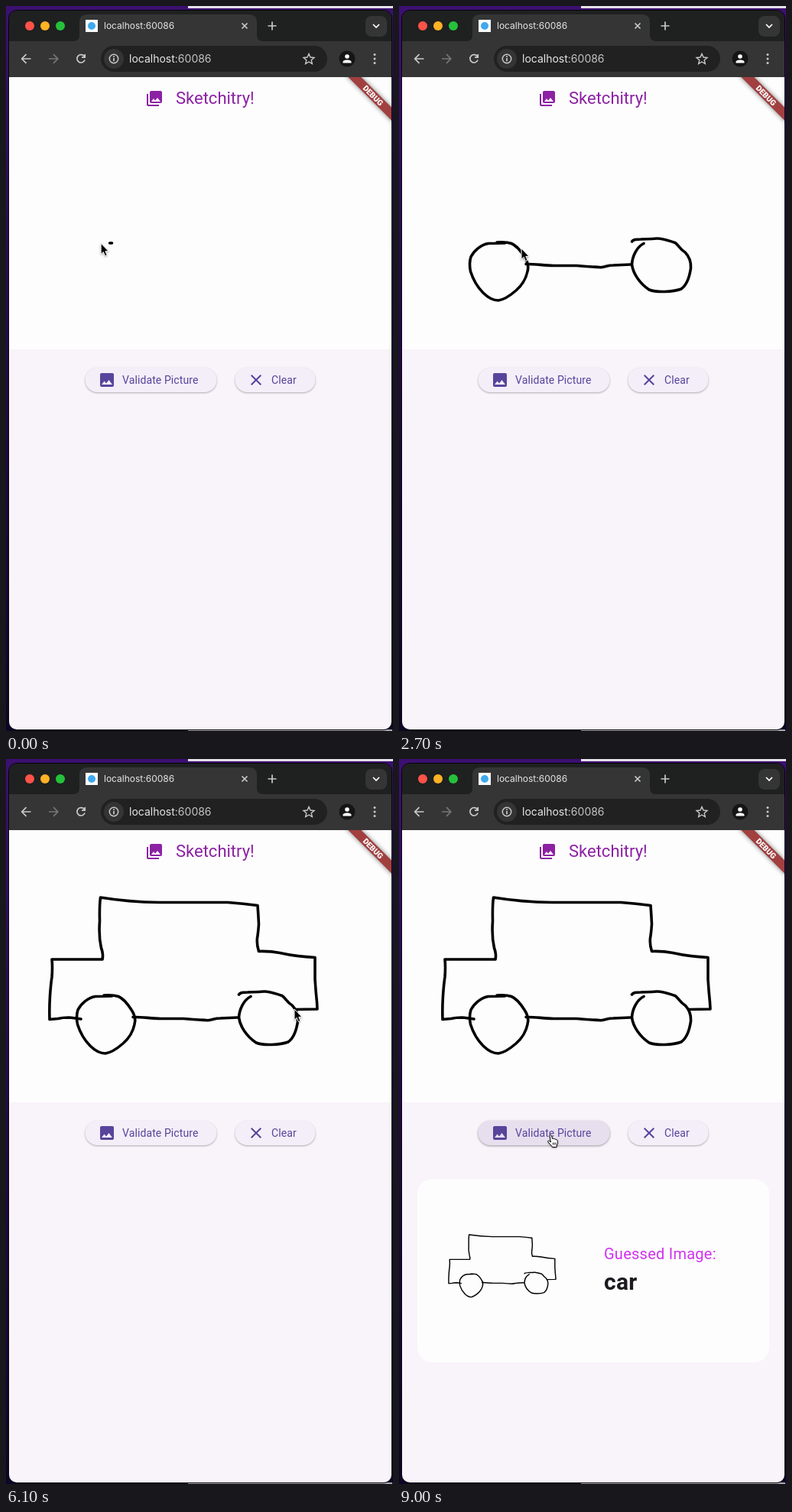
An HTML page for the animation above (9100 ms loop, 506 px wide and 948 px high).

```html
<!DOCTYPE html>
<html lang="en">
<head>
<meta charset="utf-8">
<title>Sketch guess</title>
<style>
html, body { margin: 0; width: 100%; height: 100%; overflow: hidden; background: #1a0838; }
svg { display: block; }
text { font-family: Roboto, sans-serif; }
.chrome { font-family: Inter, sans-serif; fill: #e6e6e6; }
.line { fill: none; stroke: #c9c9c9; stroke-width: 1.7; }
.ink { fill: none; stroke: #000; stroke-width: 3.6; stroke-linecap: round; stroke-linejoin: round; }
.button { fill: #f3eef8; filter: drop-shadow(0 1px 1px rgba(0, 0, 0, .3)); }
.button.hover { fill: #e7dfee; filter: drop-shadow(0 1.5px 1.8px rgba(0, 0, 0, .38)); }
.label { fill: #58449b; font-size: 14px; letter-spacing: .1px; }
.cursor { filter: drop-shadow(0 1px 1px rgba(0, 0, 0, .35)); }
</style>
</head>
<body>
<svg width="506" height="948" viewBox="0 0 506 948">
  <defs>
    <linearGradient id="desk" x2="0" y2="1">
      <stop offset="0" stop-color="#3c1070"/>
      <stop offset=".35" stop-color="#2a0a52"/>
      <stop offset="1" stop-color="#0d0626"/>
    </linearGradient>
    <clipPath id="window"><rect x="4" y="6" width="500" height="940" rx="10"/></clipPath>
    <clipPath id="page"><rect x="4" y="93" width="500" height="853"/></clipPath>
    <filter id="blur" x="-30%" y="-100%" width="160%" height="300%"><feGaussianBlur stdDeviation="3"/></filter>
  </defs>

  <!-- desktop -->
  <rect width="506" height="948" fill="url(#desk)"/>
  <path d="M238 0H506V3H238Z" fill="#e4dfe8"/>
  <path d="M505 10V948H238V946H505Z" fill="#a9a6ac"/>
  <rect x="3.5" y="5.5" width="501" height="941" rx="10.5" fill="none" stroke="#050308"/>

  <g clip-path="url(#window)">
    <!-- browser -->
    <rect x="4" y="6" width="500" height="40" fill="#1f2020"/>
    <path d="M4 46H88Q96 46 96 38V21Q96 11 106 11H318Q328 11 328 21V38Q328 46 336 46H504V93H4Z" fill="#353535"/>
    <circle cx="31" cy="26" r="6" fill="#ff5249"/>
    <circle cx="51" cy="26" r="6" fill="#ffb224"/>
    <circle cx="71" cy="26" r="6" fill="#25c13b"/>
    <rect x="104" y="18" width="16" height="16" fill="#fdfdfd"/>
    <circle cx="112" cy="26" r="5" fill="#3fa9ee"/>
    <text class="chrome" x="128" y="30" font-size="12">localhost:60086</text>
    <path class="line" d="M308.5 22.5l7 7m0-7l-7 7M342.500 26h11M348 20.500v11"/>
    <rect x="470" y="13" width="28" height="27" rx="8" fill="#353535"/>
    <path class="line" d="M480 24l4 4 4-4" style="stroke:#fff"/>
    <path class="line" d="M32.500 69H21M26.500 63.200L20.700 69l5.800 5.800"/>
    <path class="line" d="M56 69h11.500M62 63.200L67.800 69 62 74.800" style="stroke:#767676"/>
    <path class="line" d="M102.500 66A5.200 5.200 0 1 0 103 70.500M103.200 63v4.200h-4.200"/>
    <rect x="124" y="52" width="296" height="34" rx="17" fill="#212121"/>
    <circle cx="141" cy="69" r="13" fill="#343434"/>
    <circle class="line" cx="141" cy="69" r="5.700" style="stroke-width:1.500"/>
    <path class="line" d="M141 68v4.200M141 65.300v1.700"/>
    <text class="chrome" x="161" y="74" font-size="14">localhost<tspan fill="#c4c4c4">:60086</tspan></text>
    <path class="line" d="M396 62.500l2 4.500 5 .5-3.800 3.300 1.100 4.800-4.300-2.600-4.300 2.600 1.100-4.800-3.800-3.300 5-.5z" style="stroke-width:1.400"/>
    <circle cx="446" cy="69" r="10.500" fill="#151515"/>
    <circle cx="446" cy="66" r="2.800" fill="#fff"/>
    <path d="M440.500 74.500V73C440.500 69.500 451.500 69.500 451.500 73V74.500Z" fill="#fff"/>
    <g fill="#c9c9c9">
      <circle cx="482" cy="63.500" r="1.500"/><circle cx="482" cy="69" r="1.500"/><circle cx="482" cy="74.500" r="1.500"/>
    </g>

    <!-- app -->
    <rect x="4" y="93" width="500" height="853" fill="#f9f3fa"/>
    <rect x="4" y="93" width="500" height="356" fill="#fdfdfd"/>
    <g fill="#8c22a3">
      <path transform="translate(182 109)" d="M22 16V4c0-1.100-.9-2-2-2H8c-1.100 0-2 .9-2 2v12c0 1.100.9 2 2 2h12c1.100 0 2-.9 2-2zm-11-4l2.030 2.710L16 11l4 5H8l3-4zM2 6v14c0 1.100.9 2 2 2h14v-2H4V6H2z"/>
      <text x="222" y="128" font-size="22">Sketchitry!</text>
    </g>
    <g clip-path="url(#page)">
      <g transform="translate(504 93) rotate(45)">
        <rect x="-44" y="28" width="88" height="12" fill="#000" opacity=".5" filter="url(#blur)"/>
        <rect x="-44" y="28" width="88" height="12" fill="#a24040"/>
        <text y="37.600" font-size="10.200" font-weight="900" fill="#fff" text-anchor="middle">DEBUG</text>
      </g>
    </g>

    <rect id="validate" class="button" x="103.500" y="473" width="172" height="32" rx="16"/>
    <rect class="button" x="299.500" y="473" width="105" height="32" rx="16"/>
    <path transform="translate(120 477)" fill="#58449b" d="M21 19V5c0-1.100-.9-2-2-2H5c-1.100 0-2 .9-2 2v14c0 1.100.9 2 2 2h14c1.100 0 2-.9 2-2zM8.500 13.500l2.500 3.010L14.500 12l4.500 6H5l3.500-4.500z"/>
    <path d="M320.700 482.700l12.600 12.600m0-12.600l-12.600 12.600" fill="none" stroke="#58449b" stroke-width="2"/>
    <text class="label" x="152" y="494">Validate Picture</text>
    <text class="label" x="347" y="494">Clear</text>

    <g id="drawing"></g>

    <g id="card" visibility="hidden">
      <rect x="24" y="549" width="460" height="240" rx="20" fill="#fdfdfd"/>
      <use href="#drawing" transform="translate(42.200 549.600) scale(.4)"/>
      <text x="268" y="654" font-size="20" letter-spacing=".25" fill="#d032ee">Guessed Image:</text>
      <text x="268" y="694" font-size="30" letter-spacing=".25" font-weight="700" fill="#1c1a1f">car</text>
    </g>

    <g id="cursor" class="cursor">
      <path id="arrow" d="M0 0V14.200L3.200 11.300 5.400 16.600 8 15.500 5.800 10.400H10Z" fill="#000" stroke="#fff" stroke-width="1"/>
      <g id="hand" transform="translate(-4 0)" stroke="#000" stroke-linejoin="round">
        <path fill="#fff" d="M3 1.500C3.600.2 5.200.4 5.500 1.600L6.400 5.600C7.200 4.800 8.400 5 8.700 6 9.600 5.400 10.700 5.700 11 6.700 12.200 6.300 13 7 13.200 8.200 13.600 10.500 13.400 12.500 12.200 14.200L12 16.500H6.500L5.800 15.200C4 13.500 2.500 11.500.8 9.600.3 8.600 1.300 7.800 2.300 8.400L4.400 10Z"/>
        <path d="M7.300 10.500v3M9.100 10.500v3M10.900 10.500v3" stroke-width=".8"/>
      </g>
    </g>
  </g>
</svg>
<script>
const LOOP = 9100, STEP = 100;
const LEAD = 40;          // the pointer runs this far ahead of the ink, in ms
const CARD_AT = 8400;
const $ = id => document.getElementById(id);
const lerp = (a, b, k) => a + (b - a) * k;
const show = (el, on) => el.setAttribute('visibility', on ? 'inherit' : 'hidden');

// Each stroke: its path and [time, share drawn] keys.
const strokes = [
  {
    d: 'M138.500 310L117 310.500C107 312 98 320 94 328C92 334 92.500 342 93.500 347' +
       'C97 358 103 368 110 375C117 382 124 385 130 385C138 384 146 378 153 372' +
       'C161 365 166 357 168 347C170 340 168 334 164 328C159 320 153 313 147 310.500C141 308.500 135 308.500 128 309',
    keys: [[-10, 0], [850, 1]]
  },
  {
    d: 'M166 337.500C175 337 188 339 202 339.500L232 339.500Q250 341 264 341.800C271 341 273 339 280 339L303 338',
    keys: [[1030, 0], [1530, 1]]
  },
  {
    d: 'M320 310.500C311 315 305 327 304.500 338C306 350 315 363 327 371C337 375 358 374 369 370' +
       'C376 365 380 353 381.500 343C382 334 379 327 374 322C367 318 366 313 361 309.500C350 306 344 303.500 337 304' +
       'C327 305 322 304.500 316 305C309 305 306 305.500 304.500 308',
    keys: [[1720, 0], [2420, 1]]
  },
  {
    d: 'M98 340Q88 338.500 82 338Q74 338 68 339.500L57 340.500Q56.500 325 57.500 310T60 285Q61 272 60 262' +
       'L126 262Q127.500 255 124.500 247Q121 232 122.500 212Q122 192 123.500 181Q160 187 200 187.500L290 187.500' +
       'Q310 189 329 191.500Q330 205 330.500 216Q330 224 329 231Q327 240 330.500 251.500Q345 251 358 253.500' +
       'Q380 258.500 404 259.500L404 288Q405 304 406.500 318L407 327L378.500 327.500',
    keys: [[2950, 0], [4650, .652], [4720, .656], [4800, .662], [6000, 1]]
  }
];

// Interpolates rows of [time, ...values].
function sample(rows, t) {
  if (t <= rows[0][0]) return rows[0].slice(1);
  const i = rows.findIndex(row => row[0] > t);
  if (i < 0) return rows[rows.length - 1].slice(1);
  const a = rows[i - 1], b = rows[i], k = (t - a[0]) / (b[0] - a[0]);
  return a.slice(1).map((v, n) => lerp(v, b[n + 1], k));
}

const stops = [[2740, 160, 317], [6140, 377, 327], [6400, 330, 430], [6640, 255, 541], [7000, 198, 491]];

for (const s of strokes) {
  s.el = document.createElementNS('http://www.w3.org/2000/svg', 'path');
  s.el.setAttribute('class', 'ink');
  s.el.setAttribute('d', s.d);
  $('drawing').append(s.el);
  s.length = s.el.getTotalLength();
  s.start = s.keys[0][0];
  s.end = s.keys[s.keys.length - 1][0];
  for (const [time, k] of [[s.start, 0], [s.end, 1]]) {
    const p = s.el.getPointAtLength(k * s.length);
    stops.push([time, p.x, p.y]);
  }
}
stops.sort((a, b) => a[0] - b[0]);

function pointer(t) {
  const s = strokes.find(s => t >= s.start && t <= s.end);
  if (!s) return sample(stops, t);
  const p = s.el.getPointAtLength(sample(s.keys, t)[0] * s.length);
  return [p.x, p.y];
}

function render(t) {
  for (const s of strokes) {
    const drawn = sample(s.keys, t)[0] * s.length;
    show(s.el, drawn > 0);
    s.el.setAttribute('stroke-dasharray', drawn < s.length ? `${drawn} ${s.length + 10}` : 'none');
  }
  const [x, y] = pointer(t + LEAD);
  const hover = x > 104 && x < 275 && y > 473 && y < 505;
  $('cursor').setAttribute('transform', `translate(${x} ${y})`);
  show($('arrow'), !hover);
  show($('hand'), hover);
  $('validate').classList.toggle('hover', hover);
  show($('card'), t >= CARD_AT);
}

const origin = performance.now();
function tick() {
  const t = (performance.now() - origin) % LOOP;
  render(Math.floor(t / STEP) * STEP);
  requestAnimationFrame(tick);
}
tick();
</script>
</body>
</html>
```
